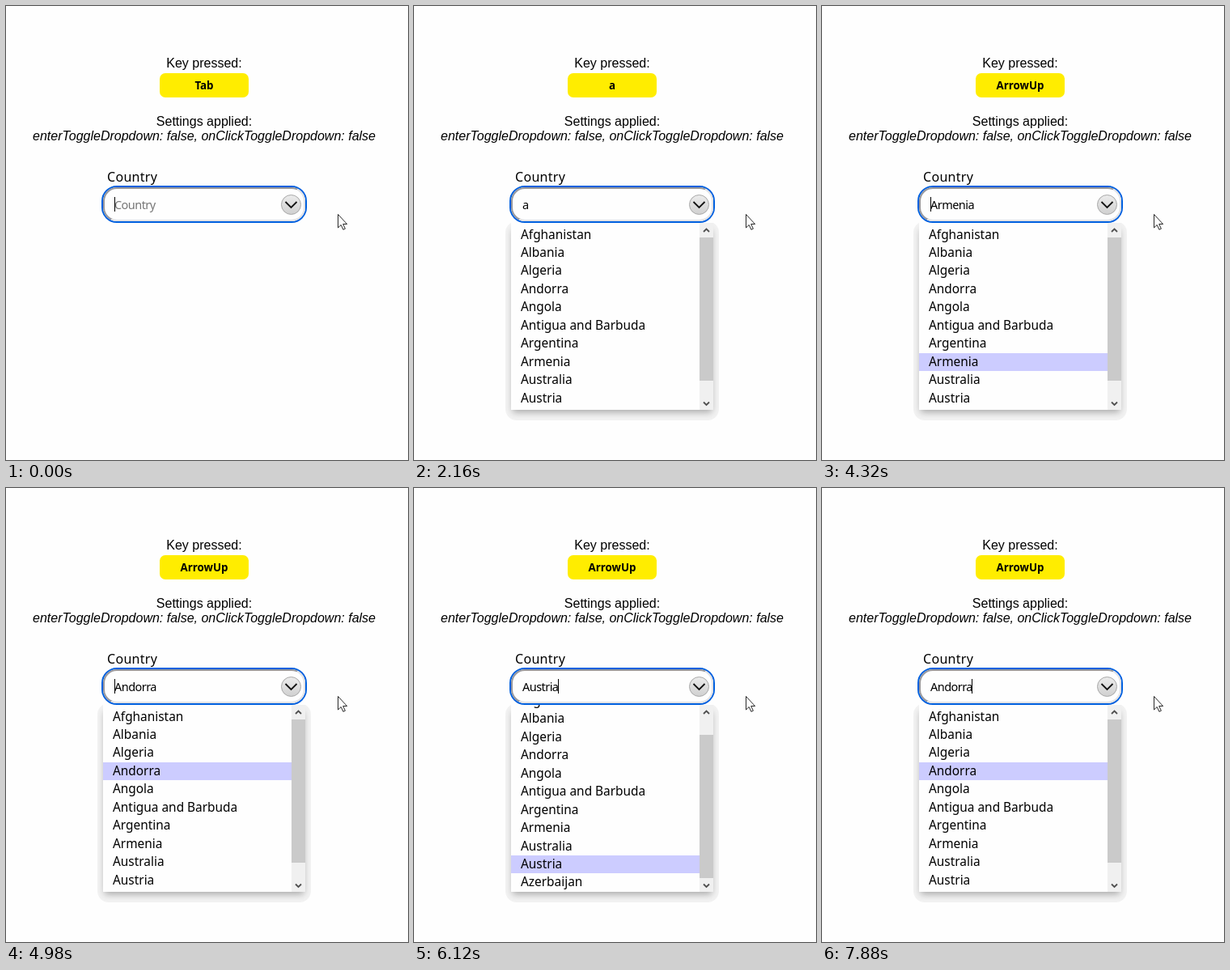
Write an HTML page that moves like this. It is 497 by 561 pixels and loops after 8 s.

```html
<!DOCTYPE html>
<html lang="en">
<head>
<meta charset="utf-8">
<title>Country combobox</title>
<style>
  html, body { margin: 0; width: 100%; height: 100%; overflow: hidden; background: #fefefe; }
  svg { display: block; width: 497px; height: 561px; }
  text { font: 16px "Liberation Sans", Arial, sans-serif; fill: #000; white-space: pre; }
  .mid { text-anchor: middle; }
  #settings { font-style: italic; }
  #key { font: bold 13.33px "Noto Sans", sans-serif; }
  #label { font: 16px "Noto Sans", sans-serif; letter-spacing: .3px; }
  #value { font: 14.5px "Noto Sans", sans-serif; letter-spacing: -.55px; }
  #rows text { font: 15.4px "Noto Sans", sans-serif; }
  .line { fill: none; stroke-width: 1.8; }
</style>
</head>
<body>
<svg viewBox="0 0 497 561">
  <defs>
    <linearGradient id="knob" x2="0" y2="1">
      <stop stop-color="#ececec"/><stop offset="1" stop-color="#d0d0d0"/>
    </linearGradient>
    <linearGradient id="inset" x2="1" y2="1">
      <stop offset=".5" stop-color="#97979c"/><stop offset=".5" stop-color="#e2e2e4"/>
    </linearGradient>
    <filter id="blur" x="-20%" y="-20%" width="140%" height="140%"><feGaussianBlur stdDeviation="4"/></filter>
    <clipPath id="below"><path d="M100 268H400V530H100Z"/></clipPath>
    <clipPath id="view"><path d="M120 268H353V499H120Z"/></clipPath>
  </defs>

  <text class="mid" x="245" y="76">Key pressed:</text>
  <rect x="190" y="83" width="110" height="30" rx="7" fill="#ffed00"/>
  <text class="mid" id="key" x="245" y="103"></text>
  <text class="mid" x="245" y="148">Settings applied:</text>
  <text class="mid" id="settings" x="245" y="166">enterToggleDropdown: false, onClickToggleDropdown: false</text>
  <text id="label" x="125" y="217">Country</text>

  <g id="menu">
    <g clip-path="url(#below)">
      <rect x="113" y="266" width="264" height="246" rx="14" fill="#f2f2f2"/>
      <rect x="122" y="277" width="246" height="225" fill="#000" opacity=".3" filter="url(#blur)"/>
    </g>
    <rect x="120" y="268" width="250" height="231" fill="#fefefe"/>
    <g clip-path="url(#view)">
      <rect id="mark" x="120" width="233" fill="#ccf"/>
      <g id="rows"></g>
    </g>
    <rect x="353" y="268" width="17" height="231" fill="#f0f0f0"/>
    <rect id="thumb" x="353" y="286" width="17" height="177" fill="#cacaca"/>
    <path class="line" stroke="#505050" d="M358 279l3.5-3.5 3.5 3.5M358 489.5l3.5 3.5 3.5-3.5"/>
  </g>

  <rect x="119" y="223" width="252" height="44" rx="18" fill="#fefefe" stroke="#0060df" stroke-width="2"/>
  <rect x="121" y="225" width="248" height="40" rx="16" fill="none" stroke="url(#inset)" stroke-width="2"/>
  <text id="value" x="134" y="251"></text>
  <rect id="caret" y="236" width="1" height="18"/>
  <circle cx="352.5" cy="245.5" r="12" fill="url(#knob)" stroke="#a8a8a8"/>
  <path class="line" stroke="#111" d="M345.5 242l7 7 7-7"/>
  <path d="M410.5 257.5V274l3.7-3.5 2.7 5.8 2.5-1.100-2.700-5.700h4.900Z" fill="#fff" stroke="#111" stroke-width=".9"/>
</svg>
<script>
const LOOP = 8000, ROW = 22.44, TOP = 271.6, SCROLL = 19.6;
const countries = ['Afghanistan', 'Albania', 'Algeria', 'Andorra', 'Angola', 'Antigua and Barbuda',
  'Argentina', 'Armenia', 'Australia', 'Austria', 'Azerbaijan'];
const count = countries.length;
const $ = id => document.getElementById(id);

const actions = {
  home(s) { s.caret = 'start'; },
  end(s) { s.caret = 'end'; },
  hide(s) { s.caret = ''; },
  type(s) { s.text = 'a'; s.caret = 'end'; },
  open(s) { s.key = 'a'; s.open = true; },
  up(s) {
    s.index = (s.index + count - 1) % count;
    s.key = 'ArrowUp';
    s.text = countries[s.index];
    s.caret = 'end';
  },
  upHidden(s) { actions.up(s); s.caret = ''; }
};

const events = [];
const add = (name, ...times) => times.forEach(time => events.push({ time, name }));
// Each press moves the caret home; the release selects the item above.
const press = (...pairs) => pairs.forEach(([down, release]) => {
  add('home', down);
  add('up', release);
});

add('hide', 560, 1610, 2160, 3690, 6840, 7320);
add('home', 1120, 3140, 3750);
add('type', 1860);
add('open', 2040);
add('upHidden', 3260, 3930);
add('end', 3320, 3990, 7880);
add('up', 6900);
press([2720, 2900], [4140, 4260], [4320, 4440], [4500, 4620], [4680, 4800], [4860, 4920],
  [4980, 5040], [5160, 5220], [5340, 5400], [5640, 5820], [6000, 6120],
  [6270, 6390], [6450, 6510], [6630, 6690], [6960, 7020], [7080, 7200]);
events.sort((a, b) => a.time - b.time);

const rows = countries.map(name => {
  const row = document.createElementNS('http://www.w3.org/2000/svg', 'text');
  row.setAttribute('x', 132);
  row.textContent = name;
  $('rows').append(row);
  return row;
});

function stateAt(time) {
  const state = { key: 'Tab', text: '', caret: 'start', index: count, open: false };
  for (const event of events) if (event.time <= time) actions[event.name](state);
  return state;
}

function render(time) {
  const { key, text, caret, index, open } = stateAt(time);
  const selected = index < count;
  const scrolled = selected && index > 7;
  const rowTop = i => Math.round(TOP + i * ROW - (scrolled ? SCROLL : 0));

  $('key').textContent = key;
  $('value').textContent = text || 'Country';
  $('value').style.fill = text ? '#000' : '#757575';
  const offset = caret === 'end' ? $('value').getComputedTextLength() : 0;
  $('caret').setAttribute('x', Math.floor(134 + offset));
  $('caret').style.display = caret ? '' : 'none';

  $('menu').style.display = open ? '' : 'none';
  $('mark').style.display = selected ? '' : 'none';
  $('mark').setAttribute('y', rowTop(index));
  $('mark').setAttribute('height', rowTop(index + 1) - rowTop(index));
  rows.forEach((row, i) => row.setAttribute('y', rowTop(i) + 16));
  $('thumb').setAttribute('y', scrolled ? 305 : 286);
}

const start = performance.now();
function tick() {
  render((performance.now() - start) % LOOP);
  requestAnimationFrame(tick);
}
tick();
</script>
</body>
</html>
```
